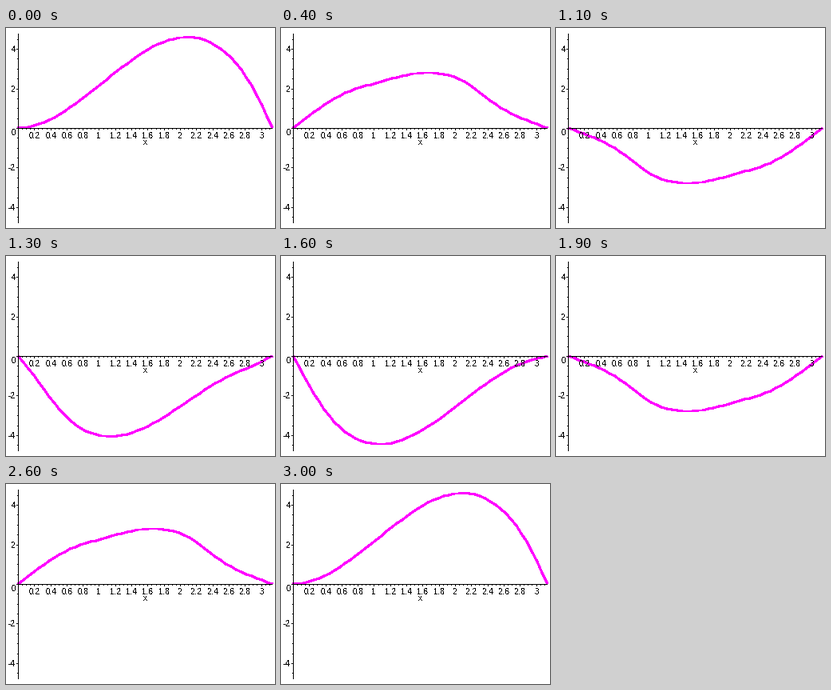
Recreate the animation shown at these times as a matplotlib script. Size 337 by 250 pixels, loop 3.1 s.

```python
import numpy as np
import matplotlib.pyplot as plt
from matplotlib.animation import FuncAnimation
from matplotlib.patches import Rectangle

W, H, DPI = 337, 250, 100
PX = 72 / DPI                  # one pixel in points
FRAMES, STEP_MS = 31, 100
X0, Y0 = 15, 125               # pixel of the coordinate origin
SX, SY = 101.5, 24.75          # pixels per unit
MODES = 10

plt.rcParams["text.hinting"] = "force_autohint"

fig = plt.figure(figsize=(W / DPI, H / DPI), dpi=DPI, facecolor="white")
ax = fig.add_axes([0, 0, 1, 1])
ax.set_xlim(0, W)
ax.set_ylim(H, 0)
ax.axis("off")


def col(x):
    return np.round(X0 + SX * x)


def row(y):
    return np.round(Y0 - SY * y)


def block(x, y, w, h):
    ax.add_patch(Rectangle((x, y), w, h, facecolor="black", linewidth=0,
                           antialiased=False, snap=False, zorder=3))


def label(x, y, text, ha="center"):
    ax.text(x, y, text, ha=ha, va="baseline", family="Liberation Sans",
            size=10 * PX, color="black", antialiased=False, zorder=4)


def tick_length(i):
    return 2 if i % 4 == 0 else 1


def draw_axes():
    block(X0, 7, 1, 237)
    block(X0, Y0, 319, 1)
    for i in range(1, 63):
        block(col(i * 0.05), Y0 + 1, 1, tick_length(i))
    for i in range(-9, 10):
        size = tick_length(i)
        block(X0 - size, row(i * 0.5), size, 1)
    for i in range(1, 16):
        label(col(i / 5) + 0.5, 138, f"{i / 5:g}")
    for value in (4, 2, -2, -4):
        label(12, row(value) + 4.5, str(value), ha="right")
    label(12, 134, "0", ha="right")
    label(174, 146, "x")


# Vibrating string released from x^2 (pi - x)
n = np.arange(1, MODES + 1)
coeff = -4 * (1 + 2 * (-1.0) ** n) / n ** 3
xs = np.linspace(0, np.pi, 50)
shapes = np.sin(np.outer(xs, n))

draw_axes()
string, = ax.plot([], [], color="#ff00ff", lw=2 * PX, antialiased=False,
                  solid_capstyle="butt", solid_joinstyle="round", zorder=2)


def update(frame):
    t = 2 * np.pi * frame / (FRAMES - 1)
    string.set_data(col(xs), row(shapes @ (coeff * np.cos(n * t))))
    return string,


anim = FuncAnimation(fig, update, frames=FRAMES, interval=STEP_MS,
                     repeat=True, repeat_delay=0, blit=False)
plt.show()
```
